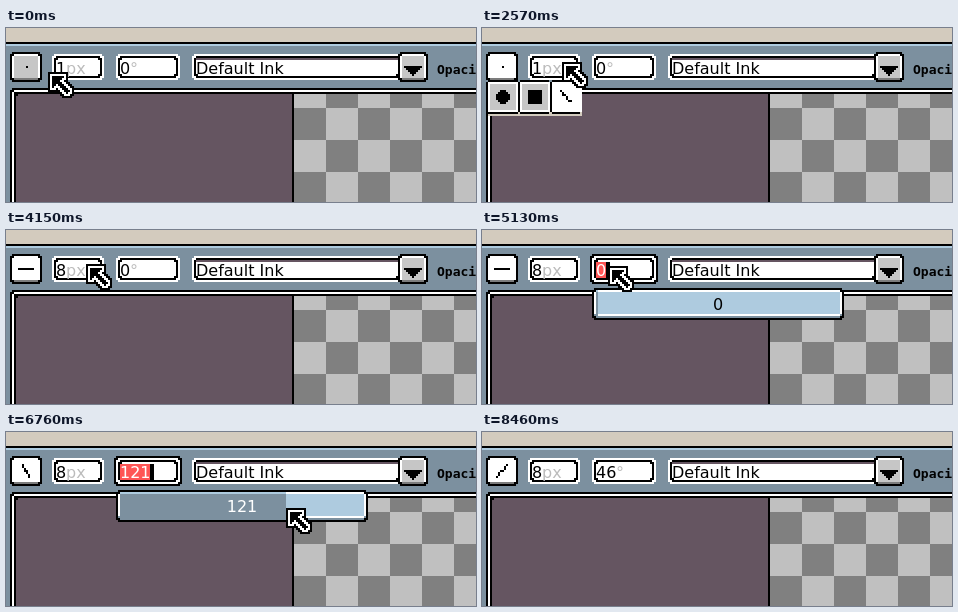
Animation, 470 px wide and 174 px high, one loop 9.26 s. Source, as an HTML page with a canvas:

```html
<!DOCTYPE html>
<html lang="en">
<head>
<meta charset="utf-8">
<title>Brush angle</title>
<style>
  html, body { margin: 0; width: 100%; height: 100%; overflow: hidden; }
  canvas { display: block; width: 470px; height: 174px; }
</style>
</head>
<body>
<canvas width="470" height="174"></canvas>
<script>
const ctx = document.querySelector('canvas').getContext('2d');
const LOOP = 9260;
const TICK = 127; // usual time between pointer steps
const U = 2; // side of one art pixel
const BLACK = '#000', WHITE = '#fff', GRAY = '#c6c6c6', PALE = '#bcbcbc', SHADE = '#7c7c7c';
const BAR = '#7c909f', SKY = '#aecbdf', PLUM = '#655561', RED = '#ff5555', TAN = '#d3cbbe';
const UI_FONT = '16px "DejaVu Sans", sans-serif';
const MINI_FONT = 'bold 13px "DejaVu Sans Mono", monospace';

// Each move runs in even steps from its first to its last time
const START = { x: 42, y: 44 };
const MOVES = [
  { first: 120, last: 120, x: 36, y: 44 },
  { first: 400, last: 400, x: 28, y: 40 },
  { first: 950, last: 950, x: 32, y: 40 },
  { first: 1380, last: 1620, x: 62, y: 66 },
  { first: 1740, last: 1890, x: 80, y: 74 },
  { first: 2170, last: 2170, x: 80, y: 52 },
  { first: 2450, last: 2570, x: 80, y: 34 },
  { first: 4710, last: 4950, x: 126, y: 36 },
  { first: 5250, last: 5680, x: 118, y: 66 },
  { first: 5830, last: 5980, x: 156, y: 74 },
  { first: 6130, last: 7120, x: 342, y: 78 },
  { first: 7250, last: 7530, x: 274, y: 78 },
  { first: 7650, last: 7920, x: 218, y: 78 },
  { first: 8040, last: 8040, x: 180, y: 78 },
  { first: 8340, last: 8340, x: 182, y: 142 }
];

const between = (t, a, b) => t >= a && t < b;
const snap = v => U * Math.round(v / U);

function pointerAt(t) {
  let { x, y } = START;
  for (const move of MOVES) {
    if (t < move.first) break;
    const span = move.last - move.first;
    const steps = Math.round(span / TICK) + 1;
    const done = t >= move.last ? steps : 1 + Math.floor((t - move.first) / span * (steps - 1));
    x += (move.x - x) * done / steps;
    y += (move.y - y) * done / steps;
  }
  return { x: snap(x), y: snap(y) };
}

function rect(x, y, w, h, color) {
  ctx.fillStyle = color;
  ctx.fillRect(x, y, w, h);
}

// Box with its corner pixels cut off
function soft(x, y, w, h, color) {
  rect(x + U, y, w - 2 * U, h, color);
  rect(x, y + U, w, h - 2 * U, color);
}

function text(str, x, y, color = BLACK, font = UI_FONT, align = 'left') {
  ctx.font = font;
  ctx.textAlign = align;
  ctx.fillStyle = color;
  ctx.fillText(str, x, y);
}

function textWidth(str) {
  ctx.font = UI_FONT;
  return snap(ctx.measureText(str).width);
}

function button(x, y, w, h, face) {
  soft(x, y, w, h, BLACK);
  soft(x + 2, y + 2, w - 4, h - 4, WHITE);
  rect(x + 4, y + 4, w - 8, h - 8, face);
  rect(x + 4, y + h - 4, w - 8, 2, SHADE);
}

function pixelLine(cx, cy, degrees, length) {
  const a = degrees * Math.PI / 180;
  const dx = Math.cos(a), dy = -Math.sin(a);
  for (let d = 1 - length / 2; d < length / 2; d += U) {
    rect(U * Math.floor((cx + d * dx) / U), U * Math.floor((cy + d * dy) / U), U, U, BLACK);
  }
}

function pixelDisc(cx, cy, radius) {
  for (let y = -radius; y < radius; y += U) {
    const half = snap(Math.sqrt(radius * radius - (y + 1) ** 2) + 1) - 1;
    rect(cx - half, cy + y, 2 * half, U, BLACK);
  }
}

function field(x, w, focused) {
  if (focused) soft(x - 2, 24, w + 4, 30, BLACK);
  soft(x, 26, w, 26, WHITE);
  soft(x + 2, 28, w - 4, 22, BLACK);
  soft(x + 4, 30, w - 8, 18, WHITE);
}

function entry(x, w, value, suffix, { focused, selected, caret }) {
  field(x, w, focused);
  const left = x + 4, width = textWidth(value);
  if (selected) rect(left, 32, width, 16, RED);
  text(value, left, 46, selected ? WHITE : BLACK);
  if (!focused) text(suffix, left + width, 46, PALE);
  if (caret) rect(left + width, 32, 4, 16, BLACK);
}

function slider(x, value, fillEnd) {
  const fill = Math.max(2, snap(fillEnd) - x - 4);
  soft(x, 58, 252, 32, BLACK);
  soft(x + 2, 60, 248, 28, BAR);
  soft(x + 2, 60, 248, 26, WHITE);
  rect(x + 4, 62, 244, 22, SKY);
  rect(x + 4, 60, fill, 2, SKY);
  rect(x + 4, 62, fill, 24, BAR);
  text(value, x + 126, 80, fillEnd > x + 126 ? WHITE : BLACK, UI_FONT, 'center');
}

function drawStage() {
  rect(0, 0, 470, 174, BAR);
  rect(0, 0, 470, 14, TAN);
  rect(0, 14, 470, 2, BLACK);
  rect(0, 16, 470, 2, SKY);
  soft(4, 60, 480, 130, BLACK);
  soft(6, 62, 478, 130, WHITE);
  rect(8, 64, 470, 130, BLACK);
  soft(10, 66, 300, 120, PLUM);
  rect(286, 66, 2, 108, BLACK);
  for (let row = 0; row < 4; row++) {
    for (let col = 0; col < 6; col++) {
      const top = Math.max(66, 48 + row * 32);
      rect(288 + col * 32, top, 32, 80 + row * 32 - top, (row + col) % 2 ? '#808080' : '#c0c0c0');
    }
  }
}

function drawInkBox() {
  field(186, 210, false);
  rect(190, 30, 204, 2, PLUM);
  text('Default Ink', 190, 46);
  button(392, 24, 30, 30, GRAY);
  for (let i = 0; i < 5; i++) rect(398 + i * 2, 38 + i * 2, 18 - i * 4, 2, BLACK);
  text('Opacity:', 431, 46, BLACK, MINI_FONT);
}

function drawBrushMenu(t) {
  const lit = [t < 1890, between(t, 1500, 1740), t >= 1740];
  rect(6, 56, 94, 32, TAN);
  lit.forEach((on, i) => {
    soft(4 + i * 32, 52, 34 - i, 34, BLACK);
    rect(6 + i * 32, 54, 30, 30, WHITE);
    if (!on) rect(8 + i * 32, 56, 26, 26, GRAY);
  });
  pixelDisc(21, 62 + 7, 7);
  rect(46, 62, 14, 14, BLACK);
  pixelLine(84, 69, -45, 17);
}

function drawPointer({ x, y }) {
  for (const [grow, color] of [[2, BLACK], [1, WHITE], [0, BLACK]]) {
    const size = (2 * grow + 1) * U;
    for (let i = 2; i <= 10; i++) {
      for (let j = 2; j <= 10; j++) {
        const head = i + j <= 9;
        const tail = Math.abs(i - j) <= 1 && i + j < 20;
        if (head || tail) rect(x + (i - grow) * U, y + (j - grow) * U, size, size, color);
      }
    }
  }
}

function draw(t) {
  const pointer = pointerAt(t);
  const sizing = between(t, 2690, 4000);
  const turning = between(t, 5070, 8340);
  const typed = t >= 3440;
  const dragged = Math.max(0, Math.round((pointer.x - 117.5) / 1.34));
  const angle = t < 5680 ? 0 : t < 8040 ? dragged : 46;

  drawStage();
  button(4, 24, 32, 30, t < 400 ? GRAY : WHITE);
  if (typed) pixelLine(20, 39, angle, 16);
  else rect(20, 38, 2, 2, BLACK);

  entry(46, 52, typed ? '8' : '1', 'px', {
    focused: between(t, 2690, 4150),
    selected: between(t, 2690, 3440),
    caret: sizing && !between(t, 3130, 3440)
  });
  entry(110, 64, String(angle), '°', {
    focused: between(t, 5070, 8460),
    selected: turning,
    caret: turning
  });
  drawInkBox();

  if (between(t, 550, 2690)) drawBrushMenu(t);
  if (sizing) slider(46, '1', 50);
  if (turning) slider(110, String(angle), 116 + angle * 1.348);
  if (t < 8460) drawPointer(pointer);
}

function tick() {
  draw(performance.now() % LOOP);
  requestAnimationFrame(tick);
}
tick();
</script>
</body>
</html>
```
